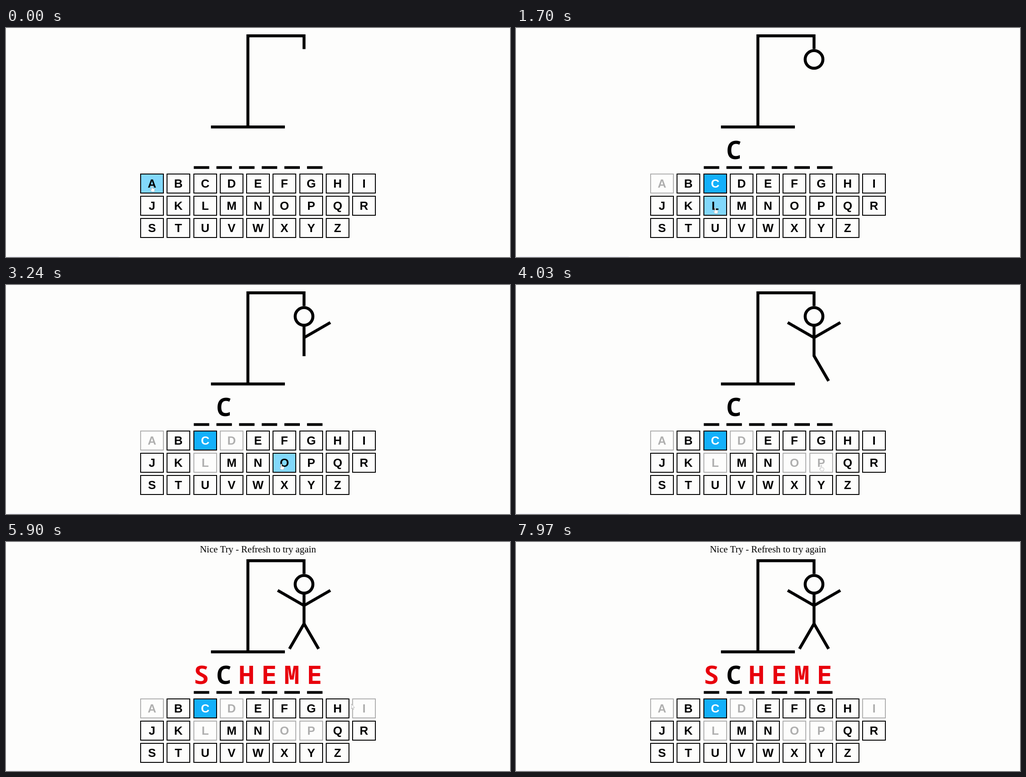
These frames come from a looping animation (1108 px wide and 505 px high, 7990 ms). An HTML page:

```html
<!DOCTYPE html>
<html lang="en">
<head>
<meta charset="utf-8">
<title>Hangman</title>
<style>
  html, body { margin: 0; width: 100%; height: 100%; overflow: hidden; background: #fdfdfc; }
  svg { display: block; }
  text { text-anchor: middle; }
  .title { font: 20.8px "Liberation Serif", "Times New Roman", serif; }
  .letter { font: bold 56px "Noto Sans Mono", monospace; }
  .key rect { fill: none; stroke: #000; stroke-width: 2; }
  .key text { font: bold 26px "Liberation Sans", Arial, sans-serif; }
  .key.hover rect { fill: #82d8fb; }
  .key.hit rect { fill: #13b0fa; }
  .key.hit text { fill: #fff; }
  .key.miss { opacity: .3; }
  .lines { fill: none; stroke: #000; stroke-width: 6.5; }
  .cursor { fill: #fff; stroke: #aaa; stroke-width: .8; stroke-linejoin: round; }
</style>
</head>
<body>
<svg width="1108" height="505" viewBox="0 0 1108 505">
  <rect x="6" y="504" width="242" height="1" fill="#ebebfa"/>
  <text class="title" id="title" x="554" y="23">Nice Try - Refresh to try again</text>
  <g id="game">
    <path class="lines" d="M450.6 218.3H613.1M531.8 218V17.3H655.2V46.5"/>
    <g class="lines" id="figure">
      <circle cx="655.2" cy="69.3" r="19.5"/>
      <path d="M655.2 89V157"/>
    </g>
    <g id="word"></g>
    <g id="keys"></g>
  </g>
  <path class="cursor" id="cursor"/>
</svg>
<script>
const LOOP = 7990, WORD = "SCHEME", SHIFT = 24, HOLD = 100;
const CLICKS = { A: 200, C: 1050, L: 1850, D: 2200, O: 3500, P: 3950, I: 4930 };
const END = CLICKS.I;
const MISSES = Object.keys(CLICKS).filter(char => !WORD.includes(char));
const HAND = "M-1 0Q0-1.5 1 0V4.5L5 5.5Q6.5 6 6 8L5 12H-.5L-4 7.5Q-3.5 6-1 7.5Z";
const ARROW = "M0 0V11L2.5 8.8L4.2 12.5L5.8 11.8L4.2 8.2H7.5Z";

const $ = id => document.getElementById(id);

function add(parent, tag, attrs, content = "") {
  const node = document.createElementNS("http://www.w3.org/2000/svg", tag);
  for (const name in attrs) node.setAttribute(name, attrs[name]);
  node.textContent = content;
  return parent.appendChild(node);
}

const show = (node, visible) => node.setAttribute("visibility", visible ? "visible" : "hidden");

function addLimb(side, offset, y, degrees) {
  const angle = degrees * Math.PI / 180, x = 655.2 + side * offset;
  const dx = side * 65 * Math.cos(angle), dy = 65 * Math.sin(angle);
  add($("figure"), "path", { d: `M${x} ${y}l${dx} ${dy}` });
}
for (const side of [1, -1]) addLimb(side, 1.6, 115.2, -30);
for (const side of [1, -1]) addLimb(side, -.5, 155.4, 60);

const letters = [...WORD].map((char, i) => {
  const x = 429.8 + i * 49.8;
  add($("word"), "rect", { x: x - 17, y: 304.7, width: 34, height: 6 });
  const fill = char in CLICKS ? "#000" : "#e8000c";
  const node = add($("word"), "text", { class: "letter", x: x - .6, y: 289, fill }, char);
  return { node, shownAt: CLICKS[char] ?? END };
});

const KEY_W = 52, KEY_H = 44;
const keys = [..."ABCDEFGHIJKLMNOPQRSTUVWXYZ"].map((char, i) => {
  const x = Math.round(295 + i % 9 * 58.25), y = 321 + Math.floor(i / 9) * 49;
  const node = add($("keys"), "g", { class: "key" });
  add(node, "rect", { x: x + 1, y: y + 1, width: KEY_W - 2, height: KEY_H - 2 });
  add(node, "text", { x: x + KEY_W / 2, y: y + 31 }, char);
  return { node, char, x, y };
});

// The pointer rests on each key around its time, then leaves the page.
const stops = Object.entries({ ...CLICKS, Q: 4690 })
  .map(([char, time]) => {
    const { x, y } = keys.find(key => key.char === char);
    return { time, x: x + KEY_W / 2, y: y + 28 };
  })
  .concat({ time: 5900, x: 759, y: 357 }, { time: 7600, x: 58, y: -25 })
  .sort((a, b) => a.time - b.time);

function pointerAt(time) {
  const next = stops.findIndex(stop => stop.time > time);
  const to = stops.at(next), from = stops[next - 1] ?? to;
  const span = to.time - from.time - 2 * HOLD;
  const u = Math.min(1, Math.max(0, (time - from.time - HOLD) / span));
  const ease = u * u * (3 - 2 * u);
  return next < 0 ? [to.x, to.y]
    : [from.x + (to.x - from.x) * ease, from.y + (to.y - from.y) * ease];
}

function draw(time) {
  const over = time >= END, shift = over ? SHIFT : 0;
  const [px, py] = pointerAt(time);
  show($("title"), over);
  $("game").setAttribute("transform", `translate(0 ${shift})`);
  [...$("figure").children].forEach((part, i) => show(part, time >= CLICKS[MISSES[i]]));
  letters.forEach(({ node, shownAt }) => show(node, time >= shownAt));

  let onKey = false;
  for (const { node, char, x, y } of keys) {
    const dx = px - x, dy = py - y - shift;
    const inside = dx >= 0 && dx < KEY_W && dy >= 0 && dy < KEY_H;
    onKey ||= inside;
    const state = time >= CLICKS[char] ? (WORD.includes(char) ? "hit" : "miss")
      : inside && !over ? "hover" : "";
    node.setAttribute("class", "key " + state);
  }
  $("cursor").setAttribute("d", onKey ? HAND : ARROW);
  $("cursor").setAttribute("transform", `translate(${px} ${py})`);
}

function tick() {
  draw(performance.now() % LOOP);
  requestAnimationFrame(tick);
}
tick();
</script>
</body>
</html>
```
